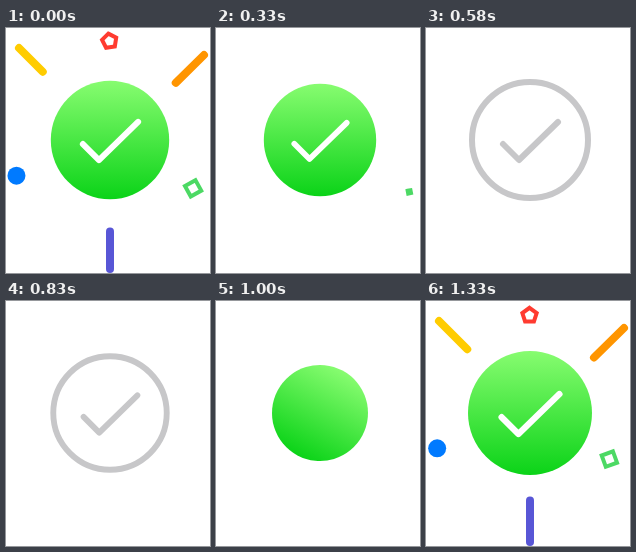
Animation of 204x245 px, one loop 1.37 s. Source, as an HTML page with a canvas:

```html
<!DOCTYPE html>
<html lang="en">
<head>
<meta charset="utf-8">
<title>Check burst</title>
<style>
  html, body { margin: 0; width: 100%; height: 100%; overflow: hidden; background: #fff; }
  canvas { display: block; width: 204px; height: 245px; }
</style>
</head>
<body>
<canvas id="stage"></canvas>
<script>
const W = 204, H = 245, LOOP = 1370, STEP = 1000 / 24, STEPS = 33;
const CX = 104, CY = 112;
const canvas = document.getElementById('stage');
const ctx = canvas.getContext('2d');
const dpr = window.devicePixelRatio || 1;
canvas.width = W * dpr;
canvas.height = H * dpr;

// Steps 14-22 show the grey ring; the burst runs from 23 to 44 across the loop point.
const RING_SCALE = [[17, 1], [18, .995], [20, .978], [21, .94], [22, .85]];
const DISC_RADIUS = [[23, 43], [24, 48], [25, 54.5], [26, 60.5], [27, 65], [28, 67.5],
  [29, 67.6], [30, 66.5], [31, 64.6], [32, 62], [33, 59.2], [35, 55.2],
  [37, 54], [39, 54.8], [41, 56.2], [44, 58.5]];
const DISC_TURN = [[23, 45], [24, 28], [25, 16], [26, 8], [27, 3], [28, 0]];

const RAYS = [
  { from: [43, 50], to: [13, 20], grow: 25, fade: 31, color: [255, 204, 0] },
  { from: [104, 199], to: [104, 241], grow: 26, fade: 31.6, color: [88, 86, 214], tint: [76, 103, 210] },
  { from: [168, 56.5], to: [198, 27], grow: 27, fade: 32, color: [255, 149, 0] }
];

const clamp = u => Math.min(1, Math.max(0, u));
const lerp = (a, b, u) => a + (b - a) * u;
const span = (n, start, length) => clamp((n - start) / length);
const ease = u => u * u * (3 - 2 * u);
const rad = deg => deg * Math.PI / 180;

function sample(keys, n) {
  if (n <= keys[0][0]) return keys[0][1];
  for (let i = 1; i < keys.length; i++) {
    const [a, va] = keys[i - 1], [b, vb] = keys[i];
    if (n <= b) return lerp(va, vb, (n - a) / (b - a));
  }
  return keys[keys.length - 1][1];
}

function blend(tint, color, n) {
  const u = span(n, 27.5, 4);
  return `rgb(${color.map((c, i) => Math.round(lerp((tint || color)[i], c, u)))})`;
}

function at(x, y, draw) {
  ctx.save();
  ctx.translate(x, y);
  draw();
  ctx.restore();
}

function dot(r) {
  ctx.beginPath();
  ctx.arc(0, 0, r, 0, Math.PI * 2);
}

function drawRay({ from, to, grow, fade, color, tint }, n) {
  const head = ease(span(n, grow, 5));
  const tail = ease(span(n, fade, 6.8));
  if (head <= 0 || tail >= 1) return;
  const point = u => [lerp(from[0], to[0], u), lerp(from[1], to[1], u)];
  ctx.strokeStyle = blend(tint, color, n);
  ctx.lineWidth = 8;
  ctx.beginPath();
  ctx.moveTo(...point(tail));
  ctx.lineTo(...point(head));
  ctx.stroke();
}

// Outline polygon with a fixed outer radius; the stroke stays inside it.
function drawPolygon(sides, outer, turn, color) {
  if (outer <= 0) return;
  const inset = Math.cos(Math.PI / sides);
  const width = Math.min(4, outer * inset);
  const r = outer - width / 2 / inset;
  ctx.rotate(rad(turn));
  ctx.beginPath();
  for (let i = 0; i < sides; i++) {
    const a = i * 2 * Math.PI / sides - Math.PI / 2;
    ctx.lineTo(r * Math.cos(a), r * Math.sin(a));
  }
  ctx.closePath();
  ctx.lineJoin = 'miter';
  ctx.lineWidth = width;
  ctx.strokeStyle = color;
  ctx.stroke();
}

// Place a particle that flies from the centre and slows towards dx, dy.
function fly(dx, dy, rest, decay, n, draw) {
  const u = 1 - rest * decay ** (n - 28);
  if (u > 0) at(CX + dx * u, CY + dy * u, draw);
}

function drawCheck(scale, amount, color) {
  if (amount <= 0) return;
  const short = 22.6, long = 54.4;
  const length = (short + long) * amount;
  const a = clamp(length / short), b = clamp((length - short) / long);
  ctx.save();
  ctx.scale(scale, scale);
  ctx.beginPath();
  ctx.moveTo(-27, 4);
  ctx.lineTo(lerp(-27, -11, a), lerp(4, 20, a));
  if (b > 0) ctx.lineTo(lerp(-11, 28, b), lerp(20, -18, b));
  ctx.lineJoin = 'round';
  ctx.lineWidth = 6;
  ctx.strokeStyle = color;
  ctx.stroke();
  ctx.restore();
}

function drawRing(n) {
  const s = sample(RING_SCALE, n), gray = '#c7c7c9';
  at(CX, CY, () => {
    dot(58 * s);
    ctx.lineWidth = 6 * s;
    ctx.strokeStyle = gray;
    ctx.stroke();
    drawCheck(s, 1, gray);
  });
}

function drawDisc(n) {
  const r = sample(DISC_RADIUS, n);
  at(CX, CY, () => {
    ctx.save();
    ctx.rotate(rad(sample(DISC_TURN, n)));
    const fill = ctx.createLinearGradient(0, -r, 0, r);
    fill.addColorStop(0, '#87fc70');
    fill.addColorStop(1, '#0bd318');
    ctx.fillStyle = fill;
    dot(r);
    ctx.fill();
    ctx.restore();
    drawCheck(r / 59, ease(span(n, 25, 4.5)), '#fff');
  });
}

function drawBurst(n) {
  RAYS.forEach(ray => drawRay(ray, n));
  const small = 1 - span(n, 34, 6);
  fly(-94.5, 36, .155, .58, n, () => {
    ctx.fillStyle = '#007aff';
    dot(9 * small);
    ctx.fill();
  });
  fly(-.5, -100.5, .31, .55, n, () =>
    drawPolygon(5, 10 * small, -9 * (n - 32), blend([240, 98, 47], [255, 59, 48], n)));
  fly(89.5, 52, .72, .63, n, () =>
    drawPolygon(4, 11.3 * (1 - span(n, 37, 7)), 25 - 9 * (n - 32), '#4cd964'));
  drawDisc(n);
}

function render(now) {
  const step = Math.floor((now % LOOP + 5) / STEP) % STEPS;
  ctx.setTransform(dpr, 0, 0, dpr, 0, 0);
  ctx.fillStyle = '#fff';
  ctx.fillRect(0, 0, W, H);
  ctx.lineCap = 'round';
  if (step >= 14 && step < 23) drawRing(step);
  else drawBurst(step < 14 ? Math.min(step + STEPS, 44) : step);
}

const start = performance.now();
function tick() {
  render(performance.now() - start);
  requestAnimationFrame(tick);
}
tick();
</script>
</body>
</html>
```
